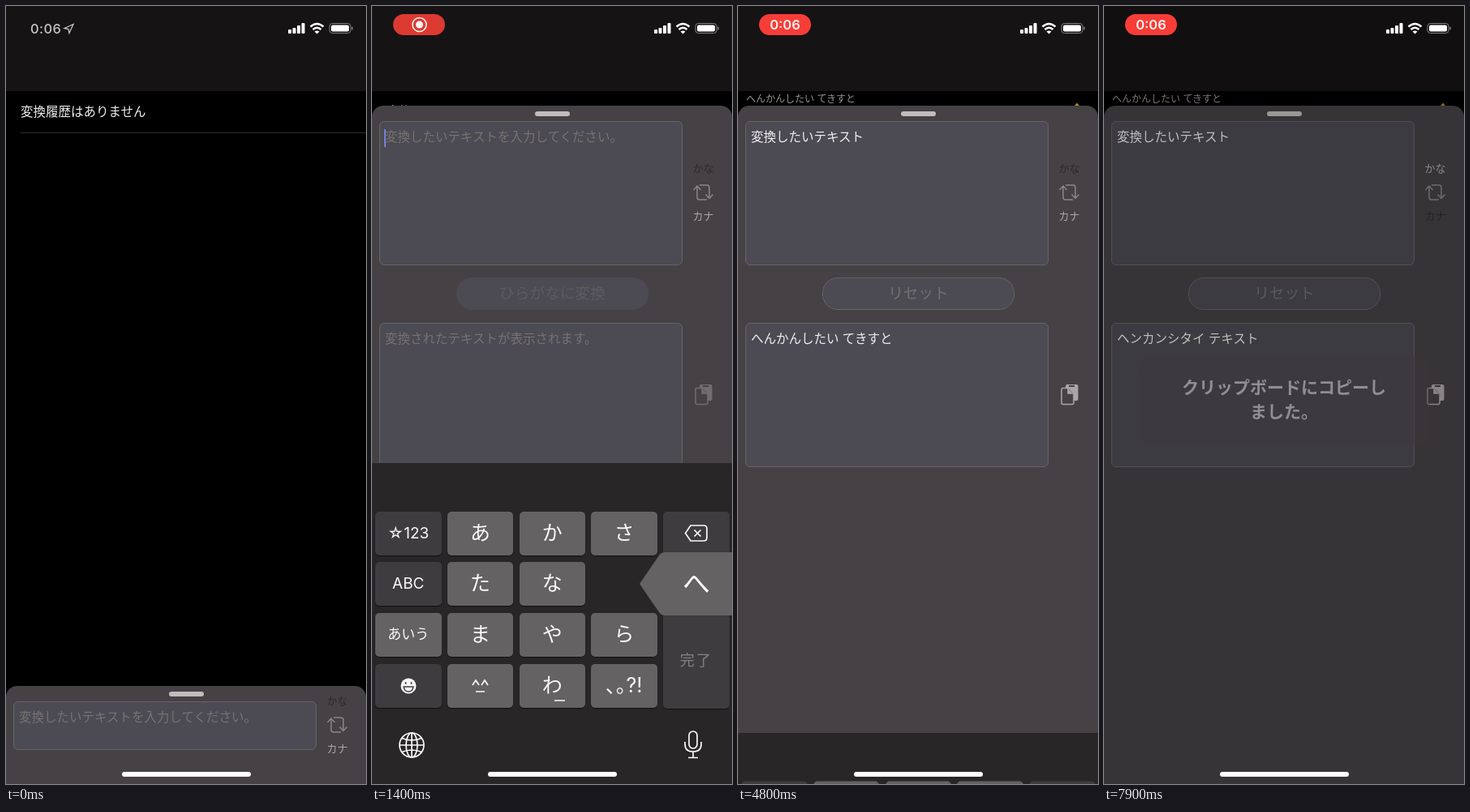
Recreate the animation shown at these times as an HTML page. Size 444x960 px, loop 8 s.

```html
<!DOCTYPE html>
<html lang="ja">
<head>
<meta charset="utf-8">
<title>ひらがな変換</title>
<style>
html, body { margin: 0; width: 100%; height: 100%; overflow: hidden; background: #000; }
body {
  --sheet: #454145; --box: #4c4a53; --edge: #686564; --light: #656264; --dark: #3f3c3f; --ink: #fbf9f8;
  position: relative; font: 15.5px/20px Inter, "Noto Sans CJK JP", sans-serif; color: #f0eeec;
}
div, svg, span { position: absolute; box-sizing: border-box; white-space: nowrap; }
svg { left: 0; top: 0; overflow: visible; }
#stage { left: 0; top: 0; width: 444px; height: 960px; overflow: hidden; }
#head { width: 444px; height: 105px; background: #161315; }
#empty { left: 18px; top: 121px; }
#rule { left: 18px; top: 156px; width: 426px; height: 1px; background: #2e2b2c; }
#row { left: 10px; top: 105px; font-size: 12px; color: #989594; }

#sheet {
  top: 123px; width: 444px; height: 850px; background: var(--sheet);
  border-radius: 14px 14px 0 0; animation: rise 8s infinite linear;
}
#grip { left: 201px; top: 7px; width: 43px; height: 6px; border-radius: 3px; background: #c0bdbc; }
.box {
  left: 9px; width: 374px; height: 178px;
  border: 1px solid var(--edge); border-radius: 6px; background: var(--box);
}
.box span { left: 6px; top: 9px; }
#in { top: 18.5px; }
#out { top: 267.5px; }
.hint { color: #777371; }
.mark { text-decoration: underline; text-decoration-thickness: 1px; text-underline-offset: 4px; }
#caret { top: 9px; left: 5px; width: 2px; height: 22px; background: #7480dc; }
#button {
  left: 104px; top: 212px; width: 237px; height: 40px; border: 1px solid var(--edge);
  border-radius: 19px; background: var(--box); color: #737070;
  font-size: 18.7px; line-height: 38px; text-align: center;
}
#button.off { border-color: var(--box); color: #5d5b62; }
#side { top: 59px; width: 444px; }
#side span { left: 388px; width: 41px; text-align: center; font-size: 13px; color: #aca8a9; }
#side .dim { color: #2e2b2d; }
#kana { top: 8px; }
#kata { top: 67px; }
.small #in { height: 60px; }
.small #side { top: 0; }
.small #button, .small #out, .small #copy { display: none; }

#keyboard {
  top: 564px; width: 444px; height: 396px; background: #292628; color: var(--ink);
  animation: board 8s infinite linear;
}
.key {
  width: 81.5px; height: 54px; border-radius: 5px; background: var(--light);
  box-shadow: 0 1px 1px #131112; text-align: center; font-size: 25px; line-height: 53px;
}
.key.dark, .key.tap { background: var(--dark); }
.key.word { font-size: 19px; }
#done { height: 118px; line-height: 117px; font-size: 18px; letter-spacing: 2px; color: #838081; }
#done.on { background: #0069ff; color: var(--ink); }
#bar { left: 12px; top: 15px; width: 379px; height: 32px; overflow: hidden; font-size: 21.8px; line-height: 30px; }
#words { display: flex; gap: 27px; }
#words span { position: static; }
#pop { width: 0; height: 0; }
#letter { width: 60px; height: 60px; margin: -30px; text-align: center; font-size: 34px; line-height: 60px; }

#time { left: 30px; top: 18px; font-size: 16.5px; font-weight: 500; letter-spacing: .4px; color: #c8c6c5; }
#pill {
  left: 26px; top: 10px; width: 64px; height: 26px; border-radius: 13px; background: #f83d37;
  color: #fff5f2; text-align: center; font-size: 16.5px; line-height: 26px; font-weight: 600;
}
#pill.rec { background: #dc3a30; }
#clock { left: 0; width: 64px; }
#home { left: 143px; top: 945px; width: 159px; height: 6px; border-radius: 3px; background: #fff; }
#cover { width: 444px; height: 960px; background: #0006; animation: fade 8s infinite linear; }
#toast {
  left: 42px; top: 432px; width: 360px; height: 110px; padding-top: 24px; border-radius: 18px;
  background: #2c292c; color: #d6d2d4; font-size: 21px; line-height: 30px; font-weight: 700;
  text-align: center;
}
@keyframes rise {
  0%, 9.125% { transform: translateY(716px); animation-timing-function: ease-in-out; }
  12.875%, 100% { transform: none; }
}
@keyframes board {
  0% { transform: translateY(396px); }
  9.125% { transform: translateY(396px); animation-timing-function: cubic-bezier(.38, .7, .125, 1); }
  15.375% { transform: none; }
  57.7% { transform: none; animation-timing-function: cubic-bezier(.38, .7, .125, 1); }
  63.95%, 100% { transform: translateY(396px); }
}
@keyframes fade {
  0%, 97.5% { opacity: 0; }
  100% { opacity: 1; }
}
</style>
</head>
<body>
<div id="stage">
  <div id="head"></div>
  <div id="empty">変換履歴はありません</div>
  <div id="rule"></div>
  <div id="row">へんかんしたい てきすと
    <svg width="1" height="1" fill="none" stroke="#b5941c" stroke-width="2"><path d="M404 21l4-5 4 5"/></svg>
  </div>

  <div id="sheet">
    <div id="grip"></div>
    <div id="in" class="box"><span id="typed"></span><div id="caret"></div></div>
    <div id="side">
      <span id="kana">かな</span><span id="kata">カナ</span>
      <svg width="1" height="1" fill="none" stroke="#8b8788" stroke-width="1.5">
        <path d="M401 41v13q0 3 3 3h9M396.5 45l4.5-5 4.5 5M404 39h9q3 0 3 3v12M411.5 50.5l4.5 5 4.5-5"/>
      </svg>
    </div>
    <div id="button"></div>
    <div id="out" class="box"><span id="result"></span></div>
    <svg id="copy" width="1" height="1" stroke-width="1.5">
      <rect x="404" y="344" width="15.5" height="20" rx="2" fill="currentColor"/>
      <path d="M408 346h7" stroke="var(--sheet)" stroke-width="2"/>
      <path d="M401 348.5h7l6 6v12q0 2-2 2h-11q-2 0-2-2v-16q0-2 2-2zM407 349v6h6" fill="var(--sheet)" stroke="currentColor"/>
    </svg>
  </div>

  <div id="keyboard">
    <div id="bar"><div id="words"></div></div>
    <svg id="fold" width="1" height="1" fill="none">
      <path d="M391.5 8v38" stroke="#3d3a3c"/><path d="M410 22l8 8 8-8" stroke="var(--ink)" stroke-width="2"/>
    </svg>
    <div id="keys"></div>
    <svg width="1" height="1" fill="none" stroke="var(--ink)" stroke-width="1.7">
      <circle cx="49" cy="348" r="15"/><ellipse cx="49" cy="348" rx="7" ry="15"/>
      <path d="M49 333v30M34 348h30M37 339.5q12 5 24 0M37 356.5q12-5 24 0"/>
      <rect x="391" y="331" width="10" height="21" rx="5"/>
      <path d="M386 344v3q0 9 10 9t10-9v-3M396 356v7M390 363.5h12"/>
      <path d="M393 77h16q4 0 4 4v11q0 4-4 4h-16l-6.5-9.5zM397.5 82.5l8 8m0-8l-8 8"/>
      <circle cx="45" cy="275" r="9.5" fill="var(--ink)" stroke="none"/>
      <path d="M41.5 270v3M48.5 270v3M39 276h12q-1 6-6 6t-6-6z" stroke="var(--dark)" stroke-width="1.5"/>
    </svg>
    <div id="pop">
      <svg width="1" height="1"><path id="flag" d="M19 0L43 -35Q46 -39 50 -39H132Q136 -39 136 -35V35Q136 39 132 39H50Q46 39 43 35Z" fill="var(--light)"/></svg>
      <div id="letter"></div>
    </div>
  </div>

  <div id="cover"><div id="toast">クリップボードにコピーし<br>ました。</div></div>

  <div id="time">0:06<svg width="1" height="1" fill="none" stroke="#c8c6c5" stroke-width="1.3"><path d="M42 9.5l11-5-5 11-1-5z"/></svg></div>
  <div id="pill"><span id="clock">0:06</span>
    <svg id="dot" width="1" height="1"><circle cx="32.5" cy="13" r="8.5" fill="none" stroke="#fff5f2" stroke-width="1.6"/><circle cx="32.5" cy="13" r="4.5" fill="#fff5f2"/></svg>
  </div>
  <svg width="1" height="1" fill="#fff">
    <rect x="348" y="29" width="4" height="5" rx="1"/><rect x="353.5" y="27" width="4" height="7" rx="1"/>
    <rect x="359" y="24" width="4" height="10" rx="1"/><rect x="364.5" y="21" width="4" height="13" rx="1"/>
    <path d="M375.5 25.5q8-7 16 0M378.5 29q5-4.5 10 0" fill="none" stroke="#fff" stroke-width="2.5"/>
    <path d="M380.5 31.5q3-2 6 0l-3 3z"/>
    <rect x="399" y="21.5" width="26" height="12" rx="3.5" fill="none" stroke="#838080"/>
    <rect x="401" y="23.5" width="22" height="8" rx="2"/><rect x="426.2" y="25.5" width="1.5" height="4" rx=".7" fill="#838080"/>
  </svg>
  <div id="home"></div>
</div>

<script>
const $ = id => document.getElementById(id);
const LOOP = 8000, OPEN = 730, COMMIT = 3350, CONVERT = 4616, TOGGLE = 6600;

// Five columns by four rows; an empty label is a key with a drawn icon.
const labels = ['☆123', 'あ', 'か', 'さ', '', 'ABC', 'た', 'な', 'は', '空白',
  'あいう', 'ま', 'や', 'ら', '完了', '', '^_^', 'わ', '､｡?!'];
const keys = {};
labels.forEach((label, i) => {
  const col = i % 5, row = Math.floor(i / 5);
  const key = document.createElement('div');
  key.className = 'key';
  if (col === 4 || (col === 0 && row !== 2)) key.classList.add('dark');
  if (col === 0 || col === 4) key.classList.add('word');
  const x = 4 + col * 88.75, y = 59.5 + row * 62.7;
  key.style.cssText = `left:${x}px;top:${y}px`;
  key.textContent = label;
  if (label === '完了') key.id = 'done';
  if (label === '空白') key.style.letterSpacing = '2px';
  if (label === 'あいう') key.style.fontSize = '17px';
  if (label === '^_^') key.innerHTML = '<svg width="1" height="1" fill="none" stroke="var(--ink)" stroke-width="1.7"><path d="M31 26l4-6 4 6M42 26l4-6 4 6M35 34h11"/></svg>';
  if (label === 'わ') key.innerHTML = 'わ<svg width="1" height="1"><path d="M43 45h13" stroke="var(--ink)" stroke-width="1.5"/></svg>';
  keys[label] = { el: key, x: x + 40.75, y: y + 27 };
  $('keys').append(key);
});

// Flicks: key, direction in quarter turns (null is a plain tap), letter.
const R = 0, D = 1, L = 2, U = 3;
const presses = [
  ['は', R, 'へ'], ['わ', U, 'ん'], ['か', null, 'か'], ['わ', U, 'ん'],
  ['さ', L, 'し'], ['た', null, 'た'], ['あ', L, 'い'],
  ['た', R, 'て'], ['か', L, 'き'], ['さ', U, 'す'], ['た', D, 'と']
];
const FIRST = 1330, BEAT = 165, HOLD = 120;

// Suggestions by the number of letters typed so far.
const guesses = [
  [0, ''], [1, 'へ 変 辺 平 部 減'], [2, 'へん 変 返 編 辺'], [4, '変換 返還 へんかん 変'],
  [7, '変換したい 返還したい'], [9, '変換したい的 変換したい'], [11, '変換したいテキスト 変換']
];

function setHtml(el, html) {
  if (el.shown !== html) { el.shown = html; el.innerHTML = html; }
}
const show = (el, on) => { el.style.display = on ? '' : 'none'; };
const hint = text => `<b class="hint" style="font-weight:400">${text}</b>`;

function drawPress(t) {
  const beat = (t - FIRST) / BEAT;
  const held = t >= FIRST && beat % 1 * BEAT < HOLD;
  const [name, turn, letter] = (held && presses[Math.floor(beat)]) || [];
  const flick = !!name && turn !== null;
  for (const k in keys) {
    keys[k].el.classList.toggle('tap', k === name && !flick);
    keys[k].el.style.visibility = k === name && flick ? 'hidden' : '';
  }
  show($('pop'), flick);
  if (!flick) return;
  const { x, y } = keys[name], a = turn * Math.PI / 2;
  $('pop').style.left = x + 'px';
  $('pop').style.top = y + 'px';
  $('flag').setAttribute('transform', `rotate(${turn * 90})`);
  $('letter').style.left = Math.cos(a) * 89 + 'px';
  $('letter').style.top = Math.sin(a) * 89 + 'px';
  $('letter').textContent = letter;
}

function drawInput(t, converted) {
  const count = Math.max(0, Math.floor((t - FIRST - HOLD) / BEAT) + 1);
  const draft = presses.slice(0, count).map(p => p[2]).join('');
  const filled = count > 0, committed = t >= COMMIT;
  setHtml($('typed'), committed ? '変換したいテキスト'
    : filled ? `<u class="mark">${draft}</u>`
    : hint('変換したいテキストを入力してください。'));
  show($('caret'), t >= OPEN && !converted && (t < 3700 || t % 1000 < 500));
  $('caret').style.left = 5 + (filled ? $('typed').offsetWidth : 0) + 'px';

  const words = converted ? '' : committed ? '代 形式 広告 で の に を'
    : guesses.filter(g => count >= g[0]).pop()[1];
  setHtml($('words'), words.split(' ').map(w => `<span>${w}</span>`).join(''));
  show($('fold'), words !== '');
  $('done').classList.toggle('on', filled);
  setHtml($('done'), filled && !committed ? '確定' : '完了');
  $('button').classList.toggle('off', !filled);
}

function draw(t) {
  const converted = t >= CONVERT, kata = t >= TOGGLE, timed = t >= 2400;
  $('sheet').classList.toggle('small', t < OPEN);

  show($('time'), t < 400);
  show($('pill'), t >= 400);
  $('pill').classList.toggle('rec', !timed);
  show($('dot'), !timed);
  show($('clock'), timed);

  drawInput(t, converted);
  drawPress(t);
  setHtml($('button'), converted ? 'リセット' : 'ひらがなに変換');
  setHtml($('result'), !converted ? hint('変換されたテキストが表示されます。')
    : kata ? 'ヘンカンシタイ テキスト' : 'へんかんしたい てきすと');
  $('copy').style.color = converted ? '#aaa6a8' : '#716d6f';
  $('kana').classList.toggle('dim', !kata);
  $('kata').classList.toggle('dim', kata);
  show($('empty'), !converted);
  show($('rule'), !converted);
  show($('row'), converted);
}

const start = performance.now();
function tick() {
  draw((performance.now() - start) % LOOP);
  requestAnimationFrame(tick);
}
tick();
</script>
</body>
</html>
```
